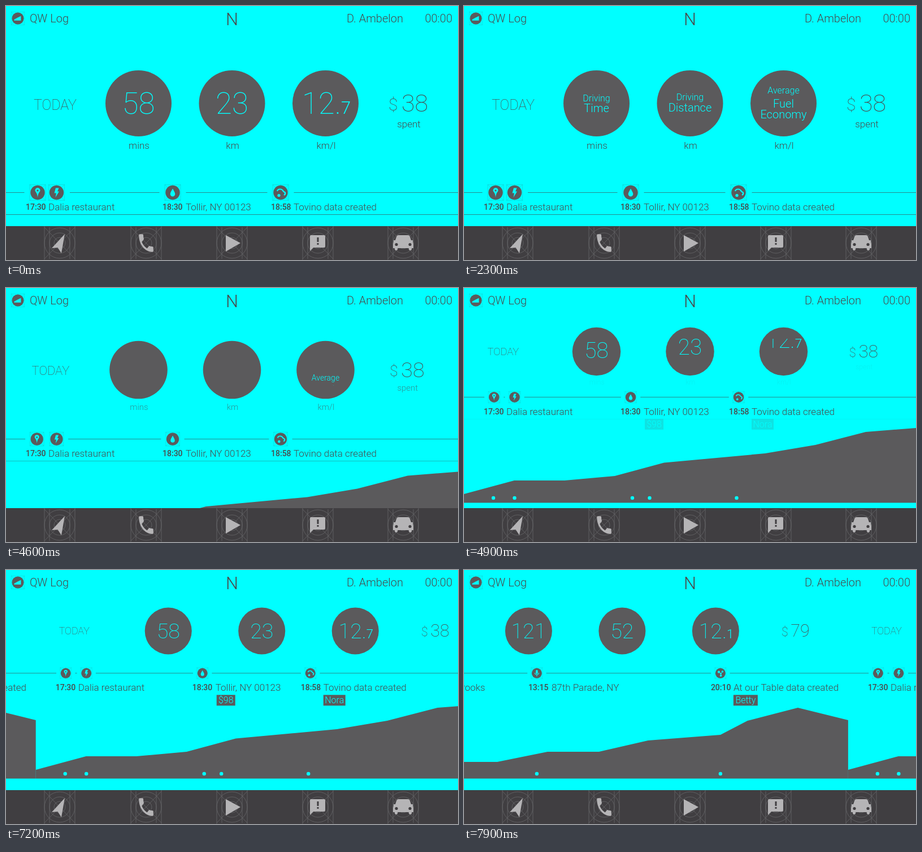
Write an HTML page that moves like this. It is 800x450 px and loops after 8 s.

```html
<!DOCTYPE html>
<html lang="en">
<head>
<meta charset="utf-8">
<title>Driving log</title>
<style>
  html, body { margin: 0; width: 100%; height: 100%; overflow: hidden; background: #0ff; }
  svg { display: block; width: 800px; height: 450px; }
  text { font: 300 17px Roboto, sans-serif; fill: #4a494b; white-space: pre; }
  .mid { text-anchor: middle; }
  .end { text-anchor: end; }
  .time { font-size: 14px; font-weight: 500; }
  .head { font-size: 20px; }
  .num { font-size: 53px; font-weight: 100; }
  .cyan, .cyan text { fill: #0ff; }
  .dark { fill: #5b5a5c; }
  .line { fill: none; stroke: #414042; opacity: .6; }
  .grid { fill: none; stroke: #414042; stroke-width: .6; opacity: .25; }
  .navgrid { fill: none; stroke: #68676a; stroke-width: .8; }
  .nav { fill: #b5b4b6; }
</style>
</head>
<body>
<svg viewBox="0 0 800 450">
  <defs><clipPath id="window"><rect x="-58" y="-31" width="116" height="62"/></clipPath></defs>
  <rect width="800" height="450" fill="#0ff"/>
  <g id="pages"></g>
  <g id="header"></g>
  <rect y="390" width="800" height="60" fill="#403e41"/>
  <g id="nav"></g>
  <circle id="touch" r="26" fill="#fff"/>
</svg>
<script>
const $ = id => document.getElementById(id);
const all = name => [...document.querySelectorAll('.' + name)];
const mix = (a, b, p) => a + (b - a) * p;
const ramp = (t, start, length) => Math.min(1, Math.max(0, (t - start) / length));
// Sine ease from 0 to 1, beginning at start and lasting length ms
const ease = (t, start, length) => (1 - Math.cos(Math.PI * ramp(t, start, length))) / 2;

const text = (x, y, s, cls = '', style = '') =>
  `<text x="${x}" y="${y}" class="${cls}" style="${style}">${s}</text>`;
const dot = (x, y, r, cls = '') => `<circle cx="${x}" cy="${y}" r="${r}" class="${cls}"/>`;
const path = (d, cls = '') => `<path d="${d}" class="${cls}"/>`;

// Small round icons, drawn around 0,0
const glyphs = {
  pin: path('M0 8.5C-1-1-4.5-1-4.5-3.8A4.5 4.5 0 0 1 4.5-3.8C4.5-1 1-1 0 8.5Z', 'cyan') + dot(0, -3.6, 1.6, 'dark'),
  bolt: path('M-1.5-8H4L1.5-2H4.5L-2 8.5L-.5 1H-4Z', 'cyan'),
  drop: path('M0-7C2-3 4.3 0 4.3 2.6A4.3 4.3 0 0 1-4.3 2.6C-4.3 0-2-3 0-7Z', 'cyan'),
  ride: '<path d="M-6-2.5Q-5-6-1-6Q3-6 5-2L8 0Q9 3 6 4.5" fill="none" stroke="#0ff" stroke-width="2.2"/>' +
    dot(-3, 5, 2.6, 'cyan'),
  mic: '<rect x="-2.5" y="-8" width="5" height="10" rx="2.5" class="cyan"/>' +
    '<path d="M-5-1A5 5 0 0 0 5-1M0 4V8" fill="none" stroke="#0ff" stroke-width="1.5"/>',
  net: '<path d="M-4-3L1 1L5-4M1 1V6" stroke="#0ff" fill="none"/>' +
    dot(-4, -3, 3, 'cyan') + dot(5, -4, 2.4, 'cyan') + dot(1, 1, 2, 'cyan') + dot(1, 6, 2.6, 'cyan')
};
const badge = glyph =>
  path('M-14-14H14V14H-14ZL14 14M14-14L-14 14M0-14V14', 'grid') + dot(0, 0, 12.7, 'dark') + glyph;

const pages = [
  {
    x: 0, title: 'TODAY', nums: ['58', '23', ['12.', '7']], cost: 38,
    hill: '0 354 89 330 178 330 267 322 354 298.5 533 282 622 267 711 244 800 237',
    dots: [52, 89.5, 298, 328.5, 482.5],
    icons: [[56, 53, 'pin'], [89.5, 89.5, 'bolt'], [295, 295, 'drop'], [486, 486, 'ride']],
    events: [[35, '17:30', 75, 'Dalia restaurant'], [277, '18:30', 318, 'Tollir, NY 00123'],
      [469, '18:58', 509, 'Tovino data created']],
    tags: [[320, 33, '$98'], [509, 39, 'Nora']]
  },
  {
    x: -800, title: '', nums: ['121', '52', ['12.', '1']], cost: 79,
    hill: '0 340 179 340 268 322 359 322 446 302 574 292 622 267 711 244 800 266',
    dots: [249, 574],
    icons: [[249, 249, 'mic'], [574, 574, 'net']],
    events: [[37, '09:20', 78, 'Elmbrooks'], [234, '13:15', 275, '87th Parade, NY'],
      [557, '20:10', 597, 'At our Table data created']],
    tags: [[597, 43, 'Betty']]
  }
];
const units = ['mins', 'km', 'km/l'];
const labels = [
  [['Driving', -3.5, 16], ['Time', 15.5, 20]],
  [['Driving', -5.5, 16], ['Distance', 14, 20]],
  [['Average', -17.5, 16], ['Fuel', 7.5, 20], ['Economy', 26.5, 20]]
];

// A stat slides from (x0, 172.5) to (x1, y1) and shrinks on the way
const stat = (x0, x1, y1, body) => `<g class="stat" data-pos="${x0} ${x1} ${y1}">${body}</g>`;

function dial(num, i) {
  const x = 234.5 + 165.5 * i;
  const value = num[0].length > 1
    ? text(1.5, 18.5, `${num[0]}<tspan font-size="31" font-weight="300">${num[1]}</tspan>`, 'num mid')
    : text(0, 18.5, num, 'num mid');
  const lines = labels[i].map(([s, y, size]) => text(0, y, s, 'mid', `font-size:${size}px`)).join('');
  return stat(x, x, 108, dot(0, 0, 58.5, 'dark') +
    `<g clip-path="url(#window)" class="cyan"><g class="value" data-i="${i}">${value}</g>` +
    `<g class="label" data-i="${i}">${lines}</g></g>` + text(1, 80.5, units[i], 'mid unit'));
}

$('pages').innerHTML = pages.map(p => `<g transform="translate(${p.x})">
  <g class="hill">${path(`M0 369.5L${p.hill} 800 369.5Z`, 'dark')}
    ${p.dots.map(x => dot(x, 361, 3.2, 'cyan')).join('')}</g>
  <g class="row">${path('', 'line rail')}${path('M0 369.5H800', 'line under')}
    ${p.events.map(([tx, time, x, name]) => text(tx, 361, time, 'time') + text(x, 362, name)).join('')}
    <g class="tags">${p.tags.map(([x, w, s]) =>
      `<rect x="${x}" y="369" width="${w}" height="19" class="dark"/>` +
      text(x + w / 2, 384, s, 'mid cyan', 'font-size:16px')).join('')}</g>
    ${p.icons.map(([a, b, name]) => `<g class="icon" data-pos="${a} ${b}">${badge(glyphs[name])}</g>`).join('')}</g>
  ${stat(87, 68, 106, text(0, 11, p.title, 'mid', 'font-size:25px;font-weight:200'))}
  ${p.nums.map(dial).join('')}
  ${stat(712, 707, 108, text(-35, 12.5, '$', '', 'font-size:30px;font-weight:100') +
    text(-12, 14.5, p.cost, '', 'font-size:43px;font-weight:200') + text(1, 42.5, 'spent', 'mid unit'))}
</g>`).join('');

$('header').innerHTML =
  `<g transform="translate(21 22) scale(.83)">${badge(path('M-8 4.5V2.5L-1-1.5L6.5-5V4.5Z', 'cyan'))}</g>` +
  text(42, 28.5, 'QW Log', 'head') + text(400, 33.5, 'N', 'mid', 'font-size:31px') +
  text(703, 28.5, 'D. Ambelon', 'head end') + text(790, 28.5, '00:00', 'head end');

// Bottom bar icons, drawn around 0,0
const bar = [
  path('M9-16L-14 9L-3.5 8L3 18Z'),
  '<g transform="scale(1.42 1.75) translate(-12 -12)">' +
    path('M6.6 10.8c1.4 2.8 3.8 5.1 6.6 6.6l2.2-2.2c.3-.3.7-.4 1-.2 1.1.4 2.3.5 3.6.5.6 0 1 .5 1 1V20c0 .6-.4 1-1 1-9.4 0-17-7.6-17-17 0-.6.5-1 1-1h3.5c.6 0 1 .5 1 1 0 1.2.2 2.4.6 3.6.1.3 0 .7-.3 1z') + '</g>',
  path('M-11-14L15 0L-11 15Z'),
  path('M-12-14H11Q13-14 13-12V6Q13 8 11 8H-8L-14 14V-12Q-14-14-12-14Z') +
    '<path d="M-1.5-10H1.5V-2H-1.5ZM-1.5 0H1.5V3H-1.5Z" fill="#403e41"/>',
  path('M-9-14H9Q11-14 12-11L14-5H17V-2Q18 0 18 3V9H15V11Q15 13 12.5 13Q10 13 10 11V9H-10V11Q-10 13-12.5 13Q-15 13-15 11V9H-18V3Q-18 0-17-2V-5H-14L-12-11Q-11-14-9-14Z') +
    '<g fill="#403e41">' + dot(-12, 2.5, 2.6) + dot(12, 2.5, 2.6) + '</g>'
];
$('nav').innerHTML = bar.map((icon, i) => `<g transform="translate(${[95, 248, 400, 552, 703][i]} 420)">
  <g class="navgrid">${path('M-27-30V30M27-30V30M-27-28L27 28M27-28L-27 28M-18-28V28M18-28V28')}
  ${dot(0, 0, 27)}${dot(0, 0, 18)}${dot(0, 0, 10)}</g><g class="nav">${icon}</g></g>`).join('');

const rails = all('rail');
const put = (el, x, y, s = 1) => el.setAttribute('transform', `translate(${x} ${y}) scale(${s})`);
const nums = el => el.dataset.pos.split(' ').map(Number);

function drawTouch(t) {
  const first = t < 5500;
  const alpha = first ? ramp(t, 2950, 250) - ramp(t, 4200, 200)
                      : ramp(t, 5990, 210) - ramp(t, 7000, 180);
  const x = first ? 400 : mix(260, 500, ease(t, 6450, 600));
  const y = first ? mix(300, 152, ease(t, 3450, 750)) : 270;
  put($('touch'), x, y);
  $('touch').setAttribute('opacity', .55 * alpha);
}

function draw(t) {
  const p = ease(t, 4238, 800);
  const size = mix(1, .71, p);

  put($('pages'), 800 * ease(t, 7001, 1204), 0);
  all('hill').forEach(el => put(el, 0, 154 * (1 - p)));
  all('row').forEach(el => put(el, 0, -147.7 * p));
  all('under').forEach(el => el.style.opacity = .6 * (1 - p));
  all('tags').forEach(el => el.style.opacity = ramp(t, 4850, 300));
  all('unit').forEach(el => el.style.opacity = 1 - p);
  all('icon').forEach(el => {
    const [a, b] = nums(el);
    put(el, mix(a, b, p), 330.5, size);
  });
  rails.forEach((el, i) => {
    const gap = 23.5 * size;
    let d = 'M0 330.5', end = 0;
    for (const [a, b] of pages[i].icons) {
      const x = mix(a, b, p);
      if (x - gap > end) d += `H${x - gap}`;
      end = x + gap;
      d += `M${end} 330.5`;
    }
    el.setAttribute('d', d + 'H800');
  });
  all('stat').forEach(el => {
    const [a, b, y] = nums(el);
    put(el, mix(a, b, p), mix(172.5, y, p), size);
  });

  // Dials roll up from values to labels, later back down
  const roll = i => ease(t, 100 + 350 * i, 1300) - ease(t, 4165 + 80 * i, 800);
  all('value').forEach(el => put(el, 0, -150 * roll(+el.dataset.i)));
  all('label').forEach(el => put(el, 0, 150 * (1 - roll(+el.dataset.i))));
  drawTouch(t);
}

const begin = performance.now();
function tick() {
  const t = (performance.now() - begin) % 8000;
  draw(Math.floor(t / 100) * 100); // ten pictures a second
  requestAnimationFrame(tick);
}
tick();
</script>
</body>
</html>
```
